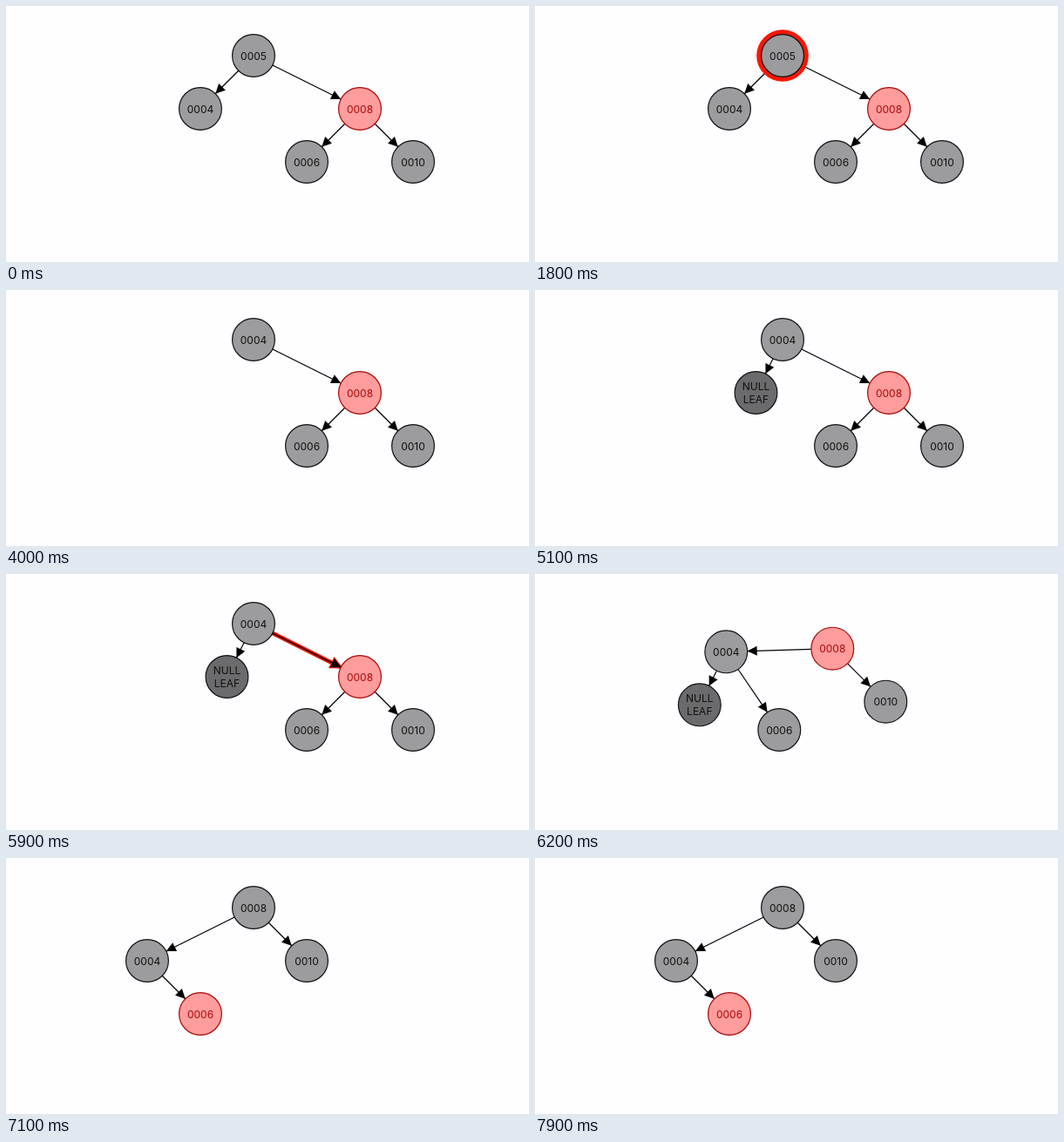
Write an HTML page with a canvas that moves like this. It is 600 px wide and 294 px high and loops after 8000 ms.

```html
<!DOCTYPE html>
<html lang="en">
<head>
<meta charset="utf-8">
<title>Red-black tree deletion</title>
<style>
  html, body { margin: 0; width: 100%; height: 100%; overflow: hidden; background: #fefdff; }
  canvas { display: block; }
</style>
</head>
<body>
<canvas id="stage" width="600" height="294"></canvas>
<script>
const ctx = document.getElementById('stage').getContext('2d');
const LOOP = 8000, STEP = 560, R = 24.4;

// Start times of the visible steps, in ms
const FOUND = 1351, SEEK = FOUND + STEP, COPY = SEEK + STEP, REMOVE = COPY + STEP;
const LEAF = 4784, MARK = LEAF + STEP, ROTATE = MARK + STEP;
const RECOLOR = ROTATE + STEP, PUSH = RECOLOR + STEP;

const BLACK = { fill: '#9c9b9d', ink: '#111' };
const RED = { fill: '#ff9c9c', ink: '#a80808' };
const DOUBLE = { fill: '#6b6a6c', ink: '#111' };

// Grid slots of the tree: column 0 lies under the root
const slot = (col, row) => ({ x: 284 + 61 * col, y: 57 + 61 * row });
const ROOT = slot(0, 0), LEFT = slot(-1, 1);

const progress = (t, start) => Math.min(1, Math.max(0, (t - start) / STEP));
const mix = (a, b, p) => ({ x: a.x + (b.x - a.x) * p, y: a.y + (b.y - a.y) * p });
const within = (t, a, b) => t >= a && t < b;

// Highlight width swings between two limits
function pulse(t) {
  const phase = (((t - 1590) / 1000) % 1 + 1) % 1;
  return 3.7 + 3 * Math.abs(1 - 2 * phase);
}

function disc(p, r) {
  ctx.beginPath();
  ctx.arc(p.x, p.y, r, 0, 2 * Math.PI);
}

function label(p, text, color) {
  ctx.fillStyle = color;
  const lines = text.split('\n');
  lines.forEach((line, i) => {
    ctx.fillText(line, p.x, p.y + 1 + (i - (lines.length - 1) / 2) * 15);
  });
}

function node(p, text, style) {
  disc(p, R);
  ctx.fillStyle = style.fill;
  ctx.fill();
  ctx.strokeStyle = style.ink;
  ctx.lineWidth = 1.2;
  ctx.stroke();
  label(p, text, style.ink);
}

function edge(a, b, glow) {
  const d = Math.hypot(b.x - a.x, b.y - a.y);
  const ux = (b.x - a.x) / d, uy = (b.y - a.y) / d;
  const tip = { x: b.x - ux * R, y: b.y - uy * R };
  const base = { x: tip.x - ux * 11, y: tip.y - uy * 11 };

  const line = new Path2D();
  line.moveTo(a.x + ux * R, a.y + uy * R);
  line.lineTo(tip.x, tip.y);
  const head = new Path2D();
  head.moveTo(tip.x, tip.y);
  head.lineTo(base.x - uy * 5.5, base.y + ux * 5.5);
  head.lineTo(base.x + uy * 5.5, base.y - ux * 5.5);
  head.closePath();

  if (glow) {
    ctx.strokeStyle = '#e81408';
    ctx.lineWidth = glow;
    ctx.stroke(line);
    ctx.lineWidth = glow / 2;
    ctx.stroke(head);
  }
  ctx.strokeStyle = ctx.fillStyle = '#000';
  ctx.lineWidth = 1.2;
  ctx.stroke(line);
  ctx.fill(head);
}

function draw(t) {
  ctx.fillStyle = '#fefdff';
  ctx.fillRect(0, 0, 600, 294);
  ctx.font = '12px Inter, "Liberation Sans", sans-serif';
  ctx.textAlign = 'center';
  ctx.textBaseline = 'middle';

  const turn = progress(t, ROTATE), turned = t >= ROTATE;
  const four = mix(ROOT, slot(-2, 1), turn);
  const eight = mix(slot(2, 1), ROOT, turn);
  const six = mix(slot(1, 2), slot(-1, 2), turn);
  const ten = mix(slot(3, 2), slot(1, 1), turn);
  const leaf = mix(slot(-0.5, 1), slot(-2.5, 2), turn);
  const hasLeft = t < REMOVE, hasLeaf = within(t, LEAF, PUSH);

  if (hasLeft) edge(ROOT, LEFT);
  if (hasLeaf) edge(four, leaf);
  if (turned) edge(eight, four);
  else edge(four, eight, within(t, MARK, ROTATE) && pulse(t));
  edge(turned ? four : eight, six);
  edge(eight, ten);

  if (within(t, FOUND, SEEK)) {
    disc(four, R + pulse(t));
    ctx.fillStyle = '#fb1606';
    ctx.fill();
  }

  const rootText = t < COPY ? '0005' : t < REMOVE ? '' : '0004';
  if (hasLeft) node(LEFT, '0004', BLACK);
  if (hasLeaf) node(leaf, 'NULL\nLEAF', DOUBLE);
  node(ten, '0010', BLACK);
  node(six, '0006', t < PUSH ? BLACK : RED);
  node(eight, '0008', t < RECOLOR ? RED : BLACK);
  node(four, rootText, within(t, RECOLOR, PUSH) ? RED : BLACK);

  if (within(t, SEEK, REMOVE)) {
    disc(mix(ROOT, LEFT, progress(t, SEEK)), R);
    ctx.strokeStyle = '#00700c';
    ctx.lineWidth = 4.9;
    ctx.stroke();
  }
  if (within(t, COPY, REMOVE)) {
    label(mix(LEFT, ROOT, progress(t, COPY)), '0004', '#1a1aff');
  }
}

const begin = performance.now();
function tick() {
  draw((performance.now() - begin) % LOOP);
  requestAnimationFrame(tick);
}
tick();
</script>
</body>
</html>
```
